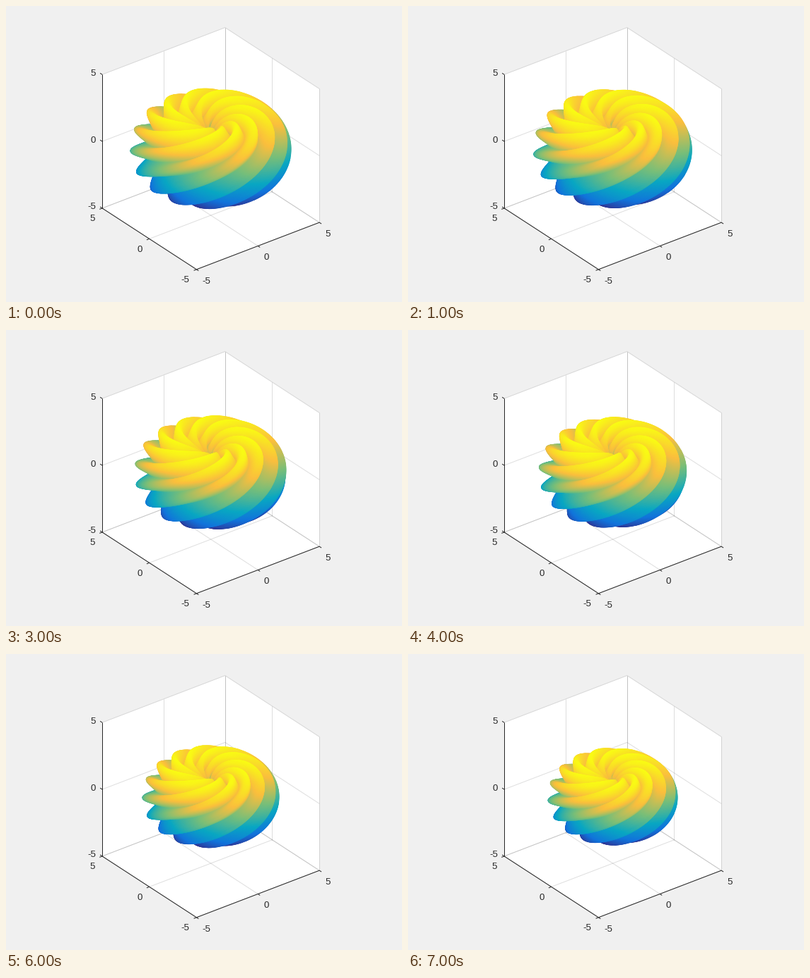
Write a matplotlib script that moves like this. It is 560 px wide and 420 px high and loops after 8000 ms.

```python
import numpy as np
import matplotlib.pyplot as plt
from matplotlib.animation import FuncAnimation
from matplotlib.colors import LinearSegmentedColormap

W, H, DPI = 560, 420, 100
PX = 72 / DPI                        # one pixel in points
FRAMES, INTERVAL = 8, 1000
UNIT = 21.9                          # pixels per data unit
CX, CY = 289.6, 202.2                # screen position of the data origin
AZ, EL = np.radians(-37.5), np.radians(30)
INK = "#262626"
LIM = 5
BLADES, GROOVE = 10, 0.4             # groove depth as a share of tube radius

SHADES = LinearSegmentedColormap.from_list("shades", [
    "#352a87", "#1173dc", "#08a7c3", "#77be7a", "#fabe3e", "#f9fb14"])


def to_screen(right, back, up):
    """Orthographic view of camera-aligned coordinates."""
    return (CX + UNIT * right,
            CY - UNIT * (back * np.sin(EL) + up * np.cos(EL)))


def project(x, y, z):
    right = x * np.cos(AZ) + y * np.sin(AZ)
    back = -x * np.sin(AZ) + y * np.cos(AZ)
    return to_screen(right, back, z)


fig = plt.figure(figsize=(W / DPI, H / DPI), dpi=DPI, facecolor="#f0f0f0")
ax = fig.add_axes([0, 0, 1, 1])
ax.set_xlim(0, W)
ax.set_ylim(H, 0)
ax.axis("off")


def line(a, b, alpha=1.0, z=2):
    (x0, y0), (x1, y1) = project(*a), project(*b)
    ax.plot([x0, x1], [y0, y1], color=INK, alpha=alpha, lw=PX, zorder=z,
            solid_capstyle="butt")


def tick(point, step, value, dx, dy):
    """Tick mark at a box edge, with its label set off by dx, dy pixels."""
    line(point, np.add(point, step))
    x, y = project(*point)
    ax.text(x + dx, y + dy, str(value), family="Liberation Sans",
            fontsize=13.3 * PX, color=INK, va="center_baseline",
            ha="left" if dx > 0 else "right")


def draw_box():
    a, b = -LIM, LIM
    hexagon = [(a, b, b), (b, b, b), (b, a, b), (b, a, a), (a, a, a), (a, b, a)]
    ax.fill(*zip(*[project(*p) for p in hexagon]), color="white", lw=0,
            zorder=0)
    for t in (a, 0, b):
        for start, end in [((t, b, a), (t, b, b)), ((a, b, t), (b, b, t)),
                           ((b, t, a), (b, t, b)), ((b, a, t), (b, b, t)),
                           ((t, a, a), (t, b, a)), ((a, t, a), (b, t, a))]:
            line(start, end, 0.15, 1)
        tick((t, a, a), (0, -0.22, 0), t, 8, 15.5)
        tick((a, t, a), (-0.22, 0, 0), t, -10, 14)
        tick((a, b, t), (0, 0.22, 0), t, -9, -3)
    for end in [(a, b, b), (a, a, a)]:
        line((a, b, a), end)
    line((a, a, a), (b, a, a))


draw_box()

# Surface grid: one direction runs across the blades, the other along them.
across = np.linspace(0, 2 * np.pi, 600, endpoint=False)[:, None]
turn = np.linspace(-np.pi, np.pi, 320)[None, :]
ripple = 1 - GROOVE * (1 - np.cos(BLADES * across)) / 2


def surface(frame):
    """Visible points, sorted far to near, and their colours."""
    tau = 0.1 * (frame + 2)
    size = 2.6 - 0.65 * tau ** 2
    phi = np.pi + 0.066 + 0.1 * frame + across + turn
    radius = size * (1 + ripple * np.cos(turn))
    right, back = radius * np.cos(phi), radius * np.sin(phi)
    up = size * ripple * np.sin(turn)
    sx, sy = to_screen(right, back, up)
    xa, xt = np.gradient(sx)
    ya, yt = np.gradient(-sy)
    front = xa * yt - ya * xt > 0
    near = (up * np.sin(EL) - back * np.cos(EL))[front]
    order = np.argsort(near)
    points = np.column_stack([sx[front], sy[front]])[order]
    return points, SHADES(0.5 + up[front][order] / (2 * size))


dots = ax.scatter([], [], s=(3 * PX) ** 2, marker="8", linewidths=0, zorder=3)


def update(frame):
    points, colors = surface(frame)
    dots.set_offsets(points)
    dots.set_facecolor(colors)
    return [dots]


anim = FuncAnimation(fig, update, frames=FRAMES, interval=INTERVAL,
                     init_func=lambda: update(0), repeat=True, repeat_delay=0)
plt.show()
```
